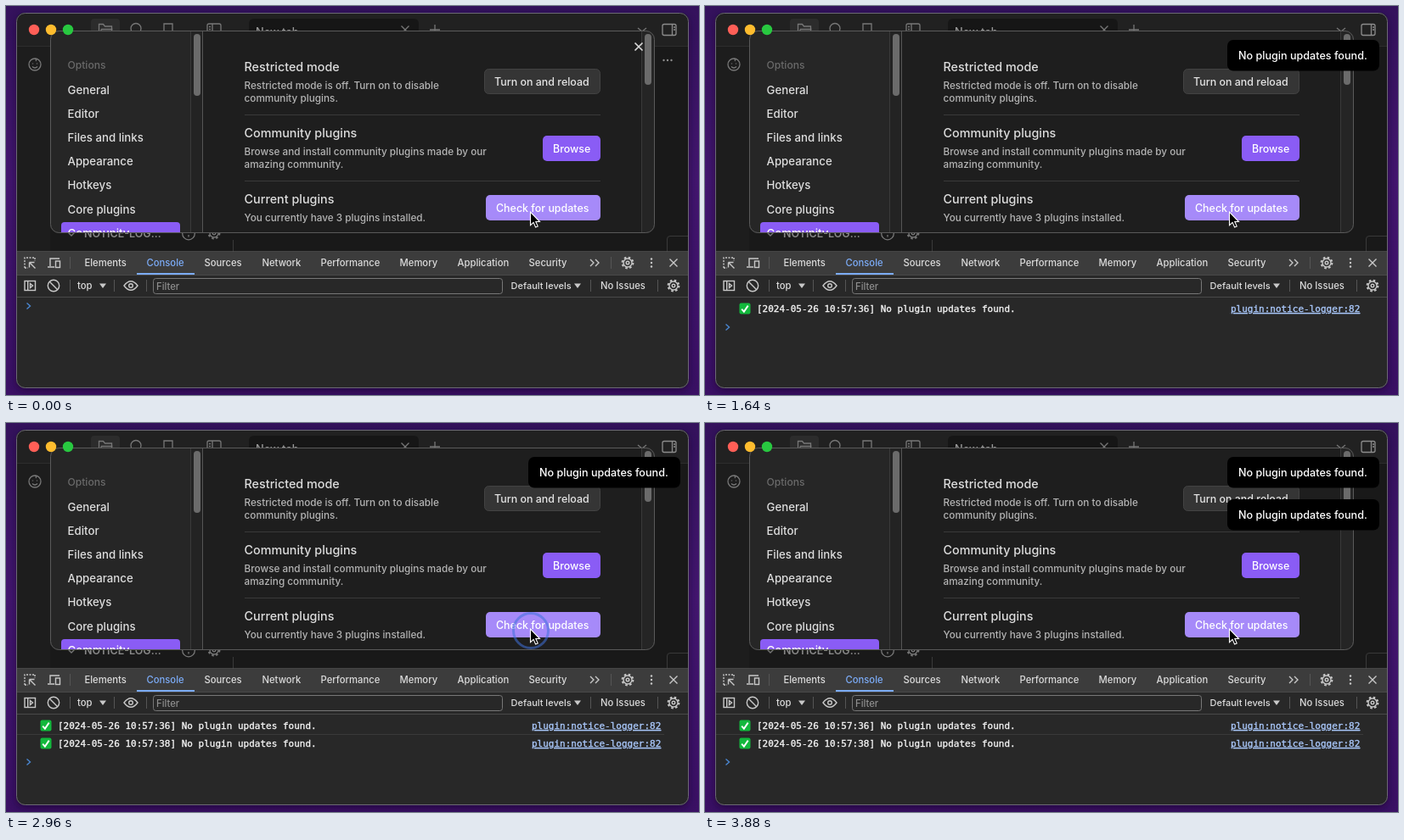
An HTML page that plays this animation: 816 by 459 pixels, repeating every 3.92 s.

```html
<!DOCTYPE html>
<html lang="en">
<head>
<meta charset="utf-8">
<title>Plugin update notices</title>
<style>
  html, body { margin: 0; width: 100%; height: 100%; overflow: hidden; background: #3b1363; }
  svg { display: block; width: 816px; height: 459px; }
  text { font-family: Inter, "Open Sans", sans-serif; font-weight: 500; white-space: pre; }
  .nav { font-size: 13.25px; fill: #dedede; }
  .head { font-size: 14.35px; fill: #dedede; }
  .desc { font-size: 11.75px; fill: #b4b4b4; }
  .btn { font-size: 12.45px; fill: #e4e4e4; }
  .cta { fill: #fff; }
  .note { font-size: 12.6px; fill: #fff; }
  .tool { font-size: 11.25px; fill: #dcdcdc; }
  .small { font-size: 11px; }
  .hint { fill: #8e8e8e; }
  .log, .link {
    font: 11px "DejaVu Sans Mono", monospace;
    fill: #f4f4f4; stroke: #f4f4f4; stroke-width: .35;
  }
  .link { fill: #a9c7fa; stroke: #a9c7fa; text-decoration: underline; }
  .ico { fill: none; stroke: #c8c8c8; stroke-width: 1.4; }
  .dim { fill: none; stroke: #777; stroke-width: 1.3; }
  .rule { fill: none; stroke: #3a3a3a; }
  .sep { fill: none; stroke: #555; }
</style>
</head>
<body>
<svg viewBox="0 0 816 459">
  <defs>
    <linearGradient id="wall" x2="0" y2="1">
      <stop offset="0" stop-color="#34125c"/>
      <stop offset=".45" stop-color="#43166f"/>
      <stop offset="1" stop-color="#3a1064"/>
    </linearGradient>
    <filter id="shade" x="-5%" y="-5%" width="110%" height="115%"><feGaussianBlur stdDeviation="5"/></filter>
    <clipPath id="win"><rect x="12" y="8" width="792" height="443" rx="10"/></clipPath>
    <clipPath id="modal"><rect x="52" y="29" width="712" height="239" rx="10"/></clipPath>
    <g id="gear">
      <circle r="6.4" stroke-width="2" stroke-dasharray="2.5 2.53"/>
      <circle r="5"/>
      <circle r="1.8"/>
    </g>
    <g id="panel"><rect x="-8" y="-6.5" width="16" height="13" rx="2"/></g>
    <path id="cross" d="M-4.5-4.5l9 9m0-9l-9 9"/>
    <g id="dots"><circle cx="-4.5" r="1.2"/><circle r="1.2"/><circle cx="4.5" r="1.2"/></g>
    <g id="notice">
      <rect width="179" height="36.500" rx="7" fill="#000"/>
      <text class="note" x="13" y="23">No plugin updates found.</text>
    </g>
    <g id="row">
      <rect x="40.500" y="350.500" width="13" height="13" rx="2" fill="#12b83c"/>
      <path d="M43.200 357.600l2.700 3 4.800-7" fill="none" stroke="#fff" stroke-width="1.900"/>
      <text class="link" x="619" y="361">plugin:notice-logger:82</text>
    </g>
  </defs>

  <rect width="816" height="459" fill="url(#wall)"/>
  <rect x="12" y="11" width="792" height="443" rx="10" fill="#14042a" opacity=".6" filter="url(#shade)"/>

  <g clip-path="url(#win)">
    <!-- dimmed app behind the dialog -->
    <rect x="12" y="8" width="792" height="282" fill="#191919"/>
    <rect x="12" y="8" width="792" height="40" fill="#212121"/>
    <rect x="12" y="48" width="40" height="242" fill="#1d1d1d"/>
    <path class="rule" d="M12 47.500H804" stroke-opacity=".5"/>
    <rect x="100" y="15" width="34" height="30" rx="4" fill="#2c2c2c"/>
    <path d="M280 48q6 0 6-6V21q0-6 6-6H480q6 0 6 6V42q0 6 6 6z" fill="#161616"/>
    <g class="dim">
      <path d="M109.500 34V21.500h5l2 2.500h8v10M109.500 34l3-6.500h13"/>
      <circle cx="153" cy="26.500" r="6"/>
      <path d="M186 35V21h10v14"/>
      <use href="#panel" x="245" y="27.500"/><path d="M243 21v13M239 24.500h2m-2 3h2"/>
      <use href="#cross" x="470" y="28"/>
      <path d="M499 28h12m-6-6v12M744 26l5 4 5-4"/>
      <g stroke="#8c8c8c"><use href="#panel" x="781" y="28"/><path d="M784.500 21.500v13M786 25h2m-2 3h2"/></g>
      <circle cx="34" cy="69" r="7"/>
      <path d="M31 71.500q3 3 6 0M31.500 67.500v1m5-1v1M34 62q2.500 1 1 3"/>
      <path d="M73 267l4 4 4-4"/>
      <circle cx="215" cy="268.500" r="7.300"/><path d="M215 270v2.500"/>
      <use href="#gear" x="245" y="268"/>
    </g>
    <use href="#dots" x="779" y="64" fill="#8c8c8c"/>
    <text x="294" y="35" font-size="12.8" fill="#999">New tab</text>
    <text x="92" y="273" font-size="12.5" style="font-weight:600" fill="#888">NOTICE-LOG…</text>
    <path class="rule" d="M267.500 276V290M778.500 290V275q0-3.500 3.500-3.500H804"/>

    <!-- settings dialog -->
    <g clip-path="url(#modal)">
      <rect x="52" y="29" width="712" height="239" fill="#1e1e1e"/>
      <rect x="52" y="29" width="180" height="239" fill="#262626"/>
      <rect x="217" y="29" width="15" height="239" fill="#232323"/>
      <rect x="748" y="29" width="16" height="239" fill="#252525"/>
      <path class="rule" d="M217.500 29V268M748.500 29V268"/>
      <path d="M231.500 29V268" stroke="#555"/>
      <rect x="221" y="33" width="8" height="73" rx="4" fill="#6b6b6b"/>
      <rect x="752" y="33" width="8" height="60" rx="4" fill="#6b6b6b"/>
      <rect x="65" y="255" width="140" height="28" rx="4" fill="#8a5cf5"/>
      <text x="72.500" y="74" font-size="12.1" fill="#6a6a6a">Options</text>
      <g class="nav">
        <text x="72.500" y="104">General</text>
        <text x="72.500" y="132">Editor</text>
        <text x="72.500" y="160">Files and links</text>
        <text x="72.500" y="188">Appearance</text>
        <text x="72.500" y="216">Hotkeys</text>
        <text x="72.500" y="245">Core plugins</text>
        <text x="72.500" y="273" fill="#fff">Community</text>
      </g>
      <g class="head">
        <text x="280.500" y="77">Restricted mode</text>
        <text x="280.500" y="155">Community plugins</text>
        <text x="280.500" y="233">Current plugins</text>
      </g>
      <g class="desc">
        <text x="280.500" y="98">Restricted mode is off. Turn on to disable</text>
        <text x="280.500" y="113">community plugins.</text>
        <text x="280.500" y="176">Browse and install community plugins made by our</text>
        <text x="280.500" y="191">amazing community.</text>
        <text x="280.500" y="254">You currently have 3 plugins installed.</text>
      </g>
      <path class="rule" d="M281 128.500H700M281 206.500H700"/>
      <rect x="563.500" y="74.500" width="136" height="29" rx="5" fill="#353535" stroke="#434343"/>
      <rect x="632" y="153" width="68" height="30" rx="5" fill="#8a5cf5"/>
      <rect x="565" y="223" width="135" height="30" rx="5" fill="#a68af9"/>
      <text class="btn" x="575" y="94">Turn on and reload</text>
      <text class="btn cta" x="644" y="173">Browse</text>
      <text class="btn cta" x="577" y="243">Check for updates</text>
    </g>
    <rect x="52.500" y="29.500" width="711" height="238" rx="10" fill="none" stroke="#5a5a5a"/>
    <use id="close" href="#cross" x="745" y="48" stroke="#d8d8d8" stroke-width="1.700"/>

    <circle cx="33" cy="28" r="6.200" fill="#ff5f57"/>
    <circle cx="53" cy="28" r="6.200" fill="#febc2e"/>
    <circle cx="73" cy="28" r="6.200" fill="#28c840"/>

    <!-- developer tools -->
    <rect x="12" y="290" width="792" height="161" fill="#282828"/>
    <rect x="12" y="290" width="792" height="27" fill="#3c3c3c"/>
    <path class="sep" d="M12 289.500H804M12 317.500H804M12 343.500H804" stroke-opacity=".75"/>
    <rect x="154" y="315" width="68" height="2" fill="#7cacf8"/>
    <path class="sep" d="M75.500 296v14M712.500 296v14M75.500 323v14M127.500 323v14M165.500 323v14M688.500 323v14M767.500 323v14"/>
    <g class="tool">
      <text x="92.500" y="307">Elements</text>
      <text x="165.500" y="307" fill="#7cacf8">Console</text>
      <text x="233.500" y="307">Sources</text>
      <text x="301.500" y="307">Network</text>
      <text x="370.500" y="307">Performance</text>
      <text x="463.500" y="307">Memory</text>
      <text x="531.500" y="307">Application</text>
      <text x="615.500" y="307">Security</text>
      <text x="84" y="334">top</text>
      <text class="small" x="594.500" y="334">Default levels</text>
      <text x="700" y="334">No Issues</text>
    </g>
    <rect x="173.500" y="321.500" width="411" height="18" rx="3" fill="#282828" stroke="#777"/>
    <text class="tool hint" x="177" y="335">Filter</text>
    <path d="M110 327.500h8l-4 5.500zM669 327.500h8l-4 5.500z" fill="#c8c8c8"/>
    <g class="ico">
      <path d="M22 309V297H34M34 297v4M22 309h4" stroke-dasharray="2 1.500"/>
      <path d="M27.500 302.500h6m-6 0v6m0-6l7 7"/>
      <path d="M52 307V298h11M49 308h8"/><rect x="58.500" y="301" width="5" height="7.500"/>
      <path d="M688 299l4 4-4 4m6-8l4 4-4 4"/>
      <use href="#gear" x="732" y="303"/>
      <use href="#cross" x="786" y="303"/>
      <rect x="22" y="324.500" width="12.500" height="11"/><path d="M25.700 324.500v11M28.500 327.500l3 2.500-3 2.500z"/>
      <circle cx="56" cy="330" r="6.700"/><path d="M51.300 325.300l9.400 9.400"/>
      <path d="M139 330q8-10.500 16 0q-8 10.500-16 0z"/><circle cx="147" cy="330" r="2.300"/>
      <use href="#gear" x="786" y="330"/>
    </g>
    <use href="#dots" transform="translate(760 303) rotate(90)" fill="#c8c8c8"/>

    <g id="log1">
      <use href="#row"/>
      <text class="log" x="61" y="361">[2024-05-26 10:57:36] No plugin updates found.</text>
    </g>
    <g id="log2">
      <path class="rule" d="M13 367.500H775"/>
      <use href="#row" y="21"/>
      <text class="log" x="61" y="382">[2024-05-26 10:57:38] No plugin updates found.</text>
    </g>
    <path id="prompt" d="M24.500 350.500l4 3.500-4 3.500" fill="none" stroke="#4a86d0" stroke-width="1.400"/>
  </g>
  <rect x="12.500" y="8.500" width="791" height="442" rx="10" fill="none" stroke="#6c6874"/>

  <use id="note1" href="#notice" x="615" y="40"/>
  <use id="note2" href="#notice" x="615" y="90"/>
  <circle id="ring" cx="618" cy="245" r="12" fill="none" stroke="#3f72dc" stroke-width="3" opacity="0"/>
  <path d="M617.500 243v15.700l3.600-3.300 2.500 5.600 2.600-1.100-2.400-5.400h4.700z" fill="#000" stroke="#fff" stroke-width="1.100"/>
</svg>
<script>
  const LOOP = 3920;
  const clicks = [780, 2720];
  const logs = [1000, 2920];
  const notes = [1080, 3000];

  // steps: [ms, style] pairs
  function play(id, steps, easing) {
    const frames = steps.map(([ms, style]) => ({ ...style, offset: ms / LOOP, easing }));
    document.getElementById(id).animate(frames, { duration: LOOP, iterations: Infinity });
  }

  function show(id, from, to = LOOP) {
    const steps = [[0, { opacity: from ? 0 : 1 }]];
    if (from) steps.push([from, { opacity: 1 }]);
    if (to < LOOP) steps.push([to, { opacity: 0 }]);
    steps.push([LOOP, { opacity: to < LOOP ? 0 : 1 }]);
    play(id, steps, "step-end");
  }

  show("close", 0, 400);
  logs.forEach((ms, i) => show("log" + (i + 1), ms));
  notes.forEach((ms, i) => show("note" + (i + 1), ms));

  const down = y => ({ transform: `translateY(${y}px)` });
  play("prompt", [[0, down(0)], [logs[0], down(25)], [logs[1], down(46)], [LOOP, down(46)]], "step-end");

  const ring = (r, opacity) => ({ r: r + "px", opacity });
  const pulses = clicks.flatMap(ms => [
    [ms, ring(12, 0)], [ms + 60, ring(16, .35)], [ms + 160, ring(20, .6)],
    [ms + 240, ring(20.5, .55)], [ms + 400, ring(21, 0)]
  ]);
  play("ring", [[0, ring(12, 0)], ...pulses, [LOOP, ring(12, 0)]], "linear");
</script>
</body>
</html>
```
